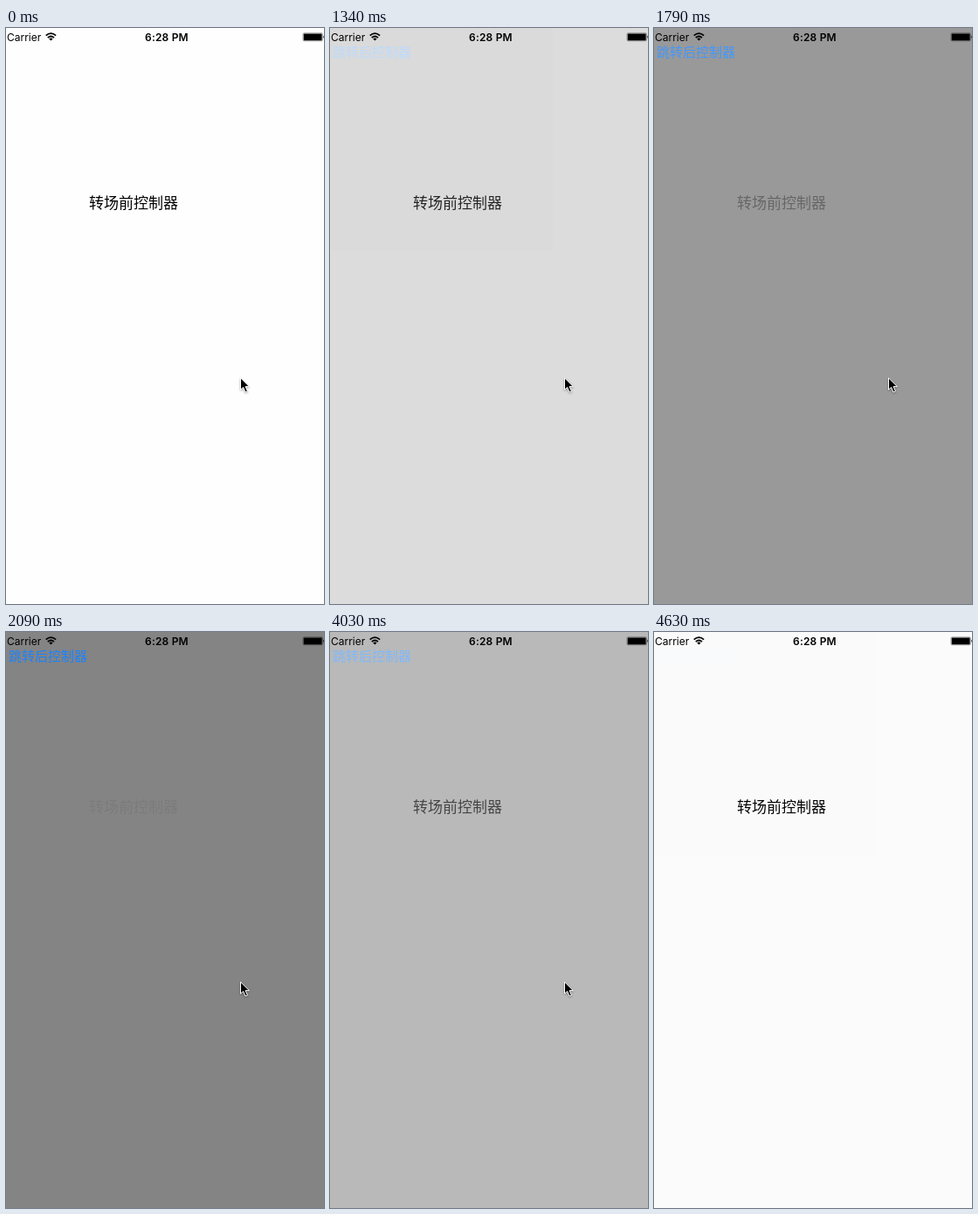
Recreate the animation shown at these times as an HTML page. Size 364 by 658 pixels, loop 5.7 s.

```html
<!DOCTYPE html>
<html lang="zh-CN">
<head>
<meta charset="utf-8">
<style>
  html, body { margin: 0; width: 100%; height: 100%; overflow: hidden; background: #fefefe; }
  svg { display: block; width: 364px; height: 658px; }
  .status { font: 12px Inter, Roboto, sans-serif; }
  .clock { font-weight: 600; letter-spacing: .2px; }
  .cjk { font-family: "Noto Sans CJK SC", "Noto Sans CJK", sans-serif; }
  #cursor { filter: drop-shadow(0 1px 1px rgba(0, 0, 0, .35)); }
</style>
</head>
<body>
<svg viewBox="0 0 364 658">
  <text class="cjk" x="95" y="206.3" font-size="17">转场前控制器</text>

  <g id="overlay" opacity="0">
    <rect width="364" height="658" fill="#808080"/>
    <text class="cjk" x="3" y="32.7" font-size="15" fill="#157efb">跳转后控制器</text>
  </g>

  <g class="status">
    <text x="1" y="14.5">Carrier</text>
    <text class="clock" x="159" y="14.5">6:28 PM</text>
    <g fill="none" stroke="#000" stroke-width="1.8">
      <path d="M45.7 8.7Q51.4 3.6 57.1 8.7"/>
      <path d="M47.8 11.1Q51.4 7.8 55 11.1"/>
    </g>
    <path d="M49.2 12.3Q51.4 10.7 53.6 12.3L51.4 14.6Z"/>
    <rect x="340" y="5.8" width="22.3" height="9" rx="1.2" fill="none" stroke="#000" stroke-opacity=".5" stroke-width=".7"/>
    <rect x="340.7" y="6.4" width="20.9" height="7.8" rx=".6"/>
    <path d="M363 8.6Q364.3 10.3 363 12Z"/>
  </g>

  <path id="cursor" d="M268.5 399.8V413.2L271.6 410.4L274 416L276.4 415L274.1 409.6H278.4Z"
        stroke="#fff" stroke-width="1"/>
</svg>
<script>
  const LOOP = 5700, STEP = 150;
  const FADE_IN = 1190, FADE_OUT = 3730, CURSOR_GONE = 4480;
  // overlay opacity, sampled once per STEP
  const rise = [.14, .28, .425, .61, .8, .955, .965];
  const fall = [.84, .7, .543, .35, .17, .035, .024];

  const overlay = document.getElementById('overlay');
  const cursor = document.getElementById('cursor');
  const start = performance.now();

  const sample = (list, t) => list[Math.min(list.length - 1, Math.floor(t / STEP))];

  function opacityAt(t) {
    if (t < FADE_IN) return 0;
    return t < FADE_OUT ? sample(rise, t - FADE_IN) : sample(fall, t - FADE_OUT);
  }

  function draw() {
    const t = (performance.now() - start) % LOOP;
    overlay.setAttribute('opacity', opacityAt(t));
    cursor.style.visibility = t < CURSOR_GONE ? 'visible' : 'hidden';
    requestAnimationFrame(draw);
  }
  draw();
</script>
</body>
</html>
```
